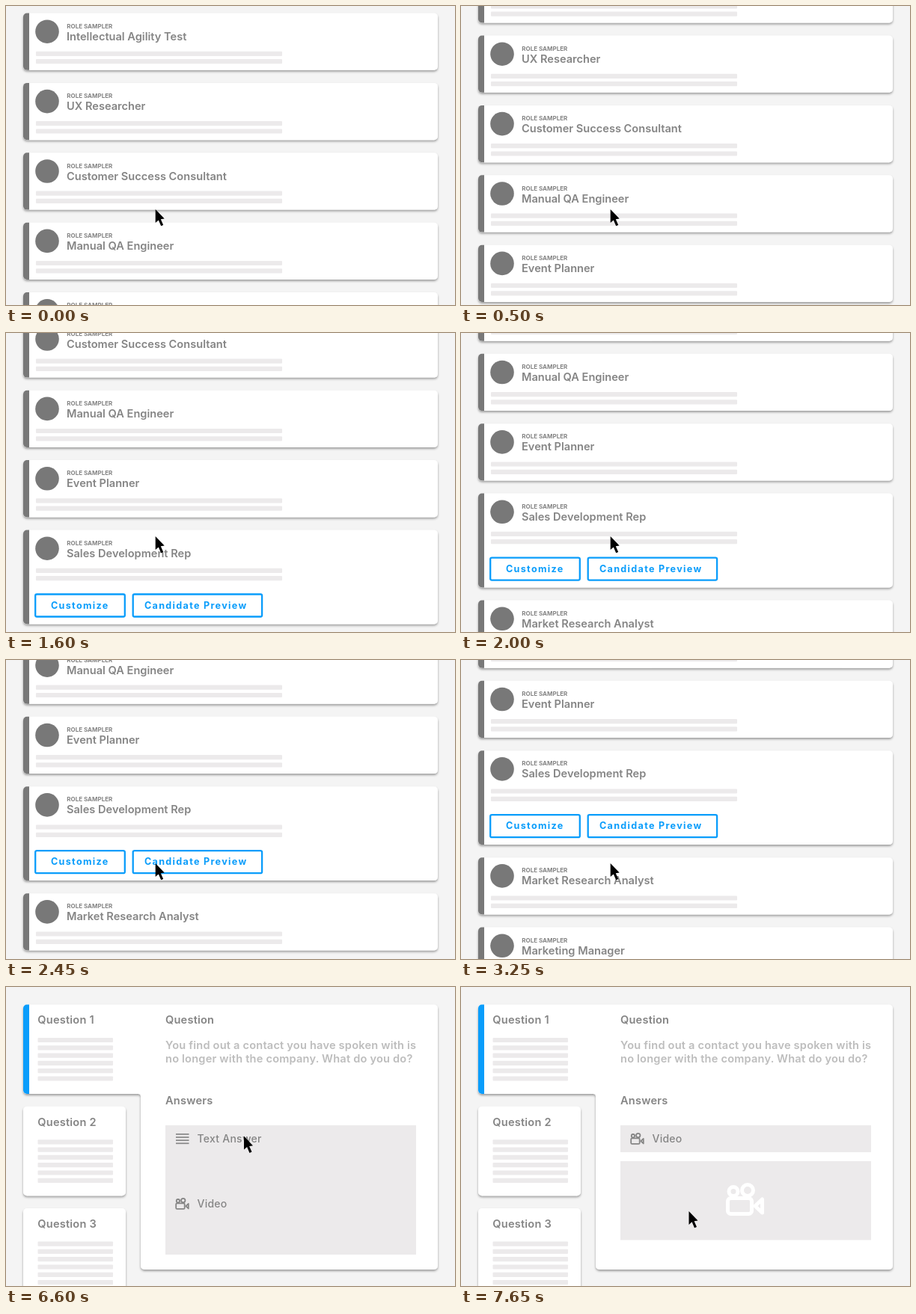
Animation, 600 px wide and 400 px high, one loop 8000 ms. Source, as an HTML page:

```html
<!DOCTYPE html>
<html lang="en">
<head>
<meta charset="utf-8">
<title>Role picker</title>
<style>
  html, body { margin: 0; width: 100%; height: 100%; overflow: hidden; background: #f4f4f4; }
  svg { display: block; width: 100vw; height: 100vh; }
  text { font: 600 14.6px Inter, "Open Sans", sans-serif; fill: #858585; }
  .brand { font-size: 8px; font-weight: 700; }
  .button { font-size: 12.6px; font-weight: 700; letter-spacing: 1.3px; fill: #0a9dfb; }
  .spaced { letter-spacing: .2px; }
  .prompt { fill: #bdbdbd; }
  .choice { font-size: 14px; font-weight: 500; letter-spacing: .25px; }
  .card { fill: #fff; filter: url(#shadow); }
  .line { fill: #eceaeb; }
</style>
</head>
<body>
<svg viewBox="0 0 600 400">
  <defs>
    <filter id="shadow" x="-5%" y="-10%" width="110%" height="125%">
      <feDropShadow dx="0" dy="2" stdDeviation="1.5" flood-opacity=".36"/>
    </filter>
    <g id="camera" fill="none" stroke="currentColor" stroke-width="5" stroke-linejoin="round">
      <circle cx="10" cy="11.5" r="6"/>
      <circle cx="29" cy="10" r="7.5"/>
      <rect x="2.5" y="20.5" width="32" height="21" rx="4"/>
      <path d="M39 31L48.5 22V40Z"/>
    </g>
  </defs>
  <rect width="600" height="400" fill="#f4f4f4"/>
  <g id="list"></g>
  <g id="editor"></g>
  <path id="cursor" d="M0 0V18L4.1 14.4L7.5 22.3L10.5 21L7.1 13.3L12 12.6Z"/>
</svg>
<script>
const $ = id => document.getElementById(id);

const text = (x, y, content, cls = '') => `<text x="${x}" y="${y}" class="${cls}">${content}</text>`;
const rect = (x, y, w, h, attrs) => `<rect x="${x}" y="${y}" width="${w}" height="${h}" ${attrs}/>`;
const lines = (x, y, w, count) => Array.from({ length: count },
  (_, i) => rect(x, y + i * 10.3, w, 6.2, 'class="line" rx="1"')).join('');
const sideBar = (y, h, color) =>
  `<path d="M31 ${y}h-3a5 5 0 0 0-5 5v${h - 10}a5 5 0 0 0 5 5h3z" fill="${color}"/>`;

// Role list
const ROLES = ['Intellectual Agility Test', 'UX Researcher', 'Customer Success Consultant',
  'Manual QA Engineer', 'Event Planner', 'Sales Development Rep', 'Market Research Analyst',
  'Marketing Manager'];
const OPEN_ROLE = 5, PITCH = 93.4, EXTRA = 49.6;

const button = (x, w, textX, label) =>
  rect(x, 86, w, 30, 'rx="2" fill="#fff" stroke="#0a9dfb" stroke-width="2.3"') + text(textX, 105.3, label, 'button');

const roleCard = (title, i) => {
  const open = i === OPEN_ROLE;
  const y = 9.5 + i * PITCH + (i > OPEN_ROLE ? EXTRA : 0);
  const height = 76.3 + (open ? EXTRA : 0);
  return `<g transform="translate(0 ${y})">
    ${rect(23, 0, 554, height, 'class="card" rx="5"')}
    ${sideBar(0, height, '#787878')}
    <circle cx="55" cy="24.7" r="15.8" fill="#787878"/>
    ${text(81.3, 20.3, 'ROLE SAMPLER', 'brand')}
    ${text(81, 36.3, title)}
    ${lines(40, 51.2, 329, 2)}
    ${open ? button(39.2, 119.6, 60, 'Customize') + button(169.7, 172.4, 185, 'Candidate Preview') : ''}
  </g>`;
};
$('list').innerHTML = ROLES.map(roleCard).join('');

// Question editor
const questionBody = (n, y) =>
  text(42.3, y + 25.8, `Question ${n}`, 'spaced') + lines(42.5, y + 44.4, 100.5, 6);
const questionCard = (n, y) =>
  rect(23, y, 137, 119.5, 'class="card" rx="5"') + questionBody(n, y);

const camera = (x, y, scale, color) =>
  `<use href="#camera" transform="translate(${x} ${y}) scale(${scale})" color="${color}"/>`;
const textChoice = [0, 1, 2, 3].map(i => rect(227, 196 + i * 4.1, 17.5, 1.8, 'fill="#8d8d8d"')).join('')
  + text(255.5, 208, 'Text Answer', 'choice');
const videoChoice = y => camera(226.3, y - 8, .36, '#858585') + text(255.5, y + 5, 'Video', 'choice');

$('editor').innerHTML = `
  ${rect(0, 0, 600, 400, 'fill="#f4f4f4"')}
  <path class="card" d="M28 23.5H572a5 5 0 0 1 5 5V373a5 5 0 0 1-5 5H185a5 5 0 0 1-5-5V146q0-3-3-3H28a5 5 0 0 1-5-5V28.5a5 5 0 0 1 5-5z"/>
  ${sideBar(23.5, 119.5, '#0a9dfb')}
  ${questionBody(1, 23.5)}
  ${questionCard(2, 159.8)}
  ${questionCard(3, 296.1)}
  ${text(213, 49.3, 'Question', 'spaced')}
  ${text(213, 83, 'You find out a contact you have spoken with is', 'spaced prompt')}
  ${text(213, 101.3, 'no longer with the company. What do you do?', 'spaced prompt')}
  ${text(213, 157.3, 'Answers', 'spaced')}
  ${rect(213, 185, 335, 36, 'class="line"')}
  ${rect(213, 233, 335, 105.5, 'class="line"')}
  <g id="textAnswer">${textChoice}${rect(219.7, 239.5, 321.5, 92.5, 'fill="#fff"')}</g>
  <g id="videoAnswer">${videoChoice(203)}${camera(354, 262, 1, '#fff')}</g>
  <g id="menu">${rect(213, 185, 335, 173, 'class="line"')}${textChoice}${videoChoice(290)}</g>`;

// Motion
const clamp = u => Math.min(1, Math.max(0, u));
const progress = (t, from, to) => clamp((t - from) / (to - from));
const smooth = u => u * u * (3 - 2 * u);

// time (s), scroll offset (px), speed (px/s)
const SCROLL = [[0, 0, 118], [1, 131.8, 138], [1.6, 213, 130], [2.45, 307.3, 87], [3.25, 355.3, 27], [3.55, 359, 0]];

function scrollAt(s) {
  const k = SCROLL.findIndex(key => key[0] > s);
  if (k < 0) return SCROLL.at(-1)[1];
  const [t0, p0, v0] = SCROLL[k - 1], [t1, p1, v1] = SCROLL[k];
  const d = t1 - t0, u = (s - t0) / d, w = 1 - u;
  return p0 + (p1 - p0) * smooth(u) + d * u * w * (v0 * w - v1 * u);
}

// start, end, x, y
const MOVES = [[3250, 4250, 98, 214], [4875, 5845, 318, 199.5], [6580, 7660, 304.5, 300]];

function cursorAt(t) {
  let x = 199.7, y = 272;
  for (const [from, to, toX, toY] of MOVES) {
    const u = smooth(progress(t, from, to));
    x += (toX - x) * u;
    y += (toY - y) * u;
  }
  return [x, y];
}

const LOOP = 8000, STEP = 50;

function draw(now) {
  const t = Math.floor(now % LOOP / STEP) * STEP;
  const answeredByVideo = t >= 7400;
  $('list').setAttribute('transform', `translate(0 ${-scrollAt(t / 1000)})`);
  $('editor').setAttribute('opacity', progress(t, 4300, 4500));
  $('menu').setAttribute('opacity', progress(t, 5700, 5900) - progress(t, 7400, 7600));
  $('textAnswer').setAttribute('opacity', answeredByVideo ? 0 : 1);
  $('videoAnswer').setAttribute('opacity', answeredByVideo ? 1 : 0);
  $('cursor').setAttribute('transform', `translate(${cursorAt(t)})`);
}

const start = performance.now();
function frame() {
  draw(performance.now() - start);
  requestAnimationFrame(frame);
}
frame();
</script>
</body>
</html>
```
